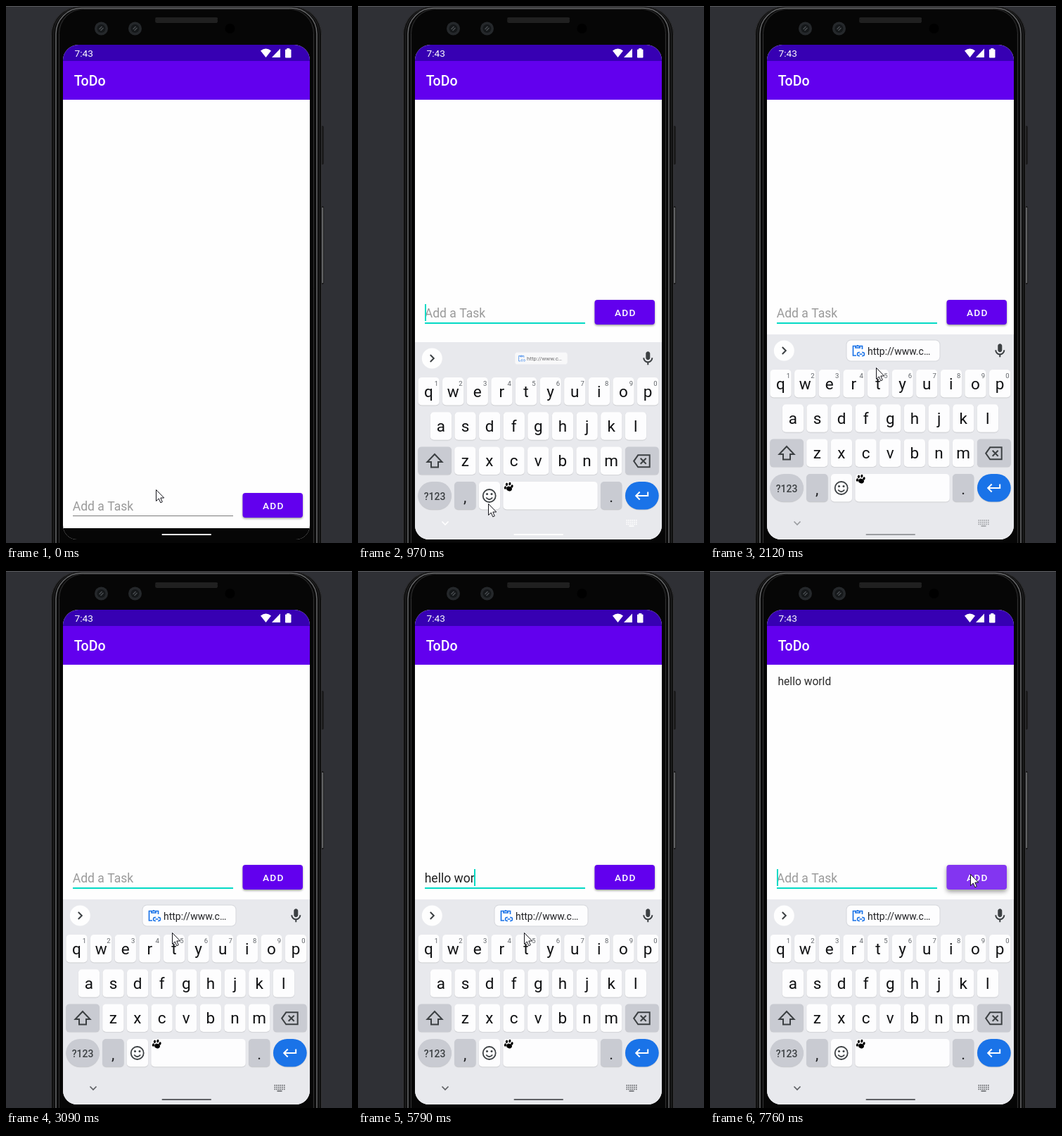
Animation, 492 px wide and 762 px high, one loop 8000 ms. Source, as an HTML page with a canvas:

```html
<!DOCTYPE html>
<html lang="en">
<head>
<meta charset="utf-8">
<title>ToDo app</title>
<style>
html, body { margin: 0; width: 100%; height: 100%; overflow: hidden; background: #2f3035; }
canvas { display: block; }
</style>
</head>
<body>
<canvas id="stage" width="492" height="762"></canvas>
<script>
const ctx = document.getElementById('stage').getContext('2d');
const LOOP = 8000;
const PURPLE = '#6200ee', TEAL = '#03dac5', INK = '#3c4043', BLUE = '#1a73e8';
const LIFT = 274;      // how far the input row rises above the keyboard
const PITCH = 34.62;   // distance between neighbouring keys

// Each track holds [start time, value]; values change abruptly.
const typed = [[0, ''], [3220, 'h'], [3640, 'he'], [3840, 'hell'], [4040, 'h'],
  [4960, 'he'], [5160, 'hell'], [5360, 'hello '], [5640, 'hello w'], [5790, 'hello wor'],
  [5940, 'hello worl'], [6090, 'hello world'], [7630, '']];
const caretOn = [[0, false], [820, true], [1270, false], [1670, true], [2120, false],
  [2660, true], [3090, false], [3220, true], [4560, false], [4960, true],
  [6530, false], [7130, true]];
const pointer = [[0, [213, 686]], [120, [208, 696]], [240, [191, 713]], [360, [185, 706]],
  [1420, [194, 672]], [1570, [217, 585]], [1720, [232, 526]], [1820, [236, 513]],
  [6680, [282, 462]], [6830, [320, 416]], [6980, [348, 411]], [7130, [370, 430]]];
const navTone = [[0, '#fff'], [2120, '#9b9da1'], [2360, '#77797d'], [2660, '#5f6165']];
const ripple = [[0, 0], [7510, 22], [7630, 50], [7760, 90]];

const valueAt = (track, t) => track.findLast(([start]) => start <= t)[1];

function box(x, y, w, h, r, fill) {
  ctx.beginPath();
  ctx.roundRect(x, y, w, h, r);
  ctx.fillStyle = fill;
  ctx.fill();
}

function disc(x, y, rx, fill, ry = rx, turn = 0) {
  ctx.beginPath();
  ctx.ellipse(x, y, rx, ry, turn, 0, 7);
  ctx.fillStyle = fill;
  ctx.fill();
}

function text(str, x, y, size, fill, { weight = 400, align = 'left', spacing = 0 } = {}) {
  ctx.font = `${weight} ${size}px Roboto, sans-serif`;
  ctx.textAlign = align;
  ctx.letterSpacing = spacing + 'px';
  ctx.fillStyle = fill;
  ctx.fillText(str, x, y);
  ctx.letterSpacing = '0px';
}

// Draws path data with its local origin at (x, y).
function icon(data, x, y, { fill, stroke, width = 2, scale = 1 }) {
  const path = new Path2D(data);
  ctx.save();
  ctx.translate(x, y);
  ctx.scale(scale, scale);
  if (fill) { ctx.fillStyle = fill; ctx.fill(path); }
  if (stroke) { ctx.strokeStyle = stroke; ctx.lineWidth = width; ctx.stroke(path); }
  ctx.restore();
}

function withShadow(blur, dy, alpha, draw) {
  ctx.save();
  ctx.shadowColor = `rgba(0,0,0,${alpha})`;
  ctx.shadowBlur = blur;
  ctx.shadowOffsetY = dy;
  draw();
  ctx.restore();
}

function drawPhone() {
  ctx.fillStyle = '#2f3035';
  ctx.fillRect(0, 0, 492, 762);
  ctx.fillStyle = '#5b5c60';
  ctx.fillRect(0, 0, 492, 1);
  box(447, 170, 5, 55, 2, '#1b1b1c');
  box(447, 284, 5, 111, 2, '#1b1b1c');
  ctx.fillStyle = '#77787a';
  ctx.fillRect(449.5, 286, 1.5, 107);
  box(64, 1, 385, 820, 40, '#0a0a0a');
  [[64.5, '#353537', 1], [67.5, '#1c1c1d', 2], [71, '#68696b', 1.5], [75.5, '#303031', 1]]
    .forEach(([x, tone, width]) => {
      const inset = x - 64;
      ctx.beginPath();
      ctx.roundRect(x, 1 + inset * 0.3, 385 - 2 * inset, 820, 40 - inset * 0.5);
      ctx.strokeStyle = tone;
      ctx.lineWidth = width;
      ctx.stroke();
    });
  box(77, 5, 359, 800, 34, '#060606');

  box(212, 16, 89, 8, 2, '#1b1b1b');
  for (let y = 17; y < 24; y += 2)
    for (let x = 213 + y % 4 / 2; x < 300; x += 2) {
      ctx.fillStyle = '#303030';
      ctx.fillRect(x, y, 1, 1);
    }
  for (const x of [135.5, 183.5]) {
    disc(x, 32, 9.5, '#25282b');
    disc(x, 32, 6, '#15181a');
    icon('M-3 1L1-3M-1 3L3-1', x, 32, { stroke: '#4b5053', width: 1.3 });
  }
  disc(318.5, 32, 7, '#000');
}

function drawStatusBar() {
  ctx.fillStyle = '#3700b3';
  ctx.fillRect(81, 55, 351, 23);
  ctx.fillStyle = PURPLE;
  ctx.fillRect(81, 78, 351, 55);
  text('7:43', 97.5, 72, 13.7, '#fff');
  text('ToDo', 96.7, 113, 19.5, '#fff', { weight: 500 });
  icon('M0 3.5Q7.5-2.5 15 3.5L7.5 13Z', 362, 60, { fill: '#fff' });
  icon('M12 0V12.5H0Z', 378, 60.5, { fill: '#fff' });
  box(397, 61.5, 8.5, 12, 1, '#fff');
  box(399.3, 60, 4, 3, 0, '#fff');
}

function drawInputRow(t, raised) {
  const y = raised ? 0 : LIFT;
  const focused = t >= 820;
  const value = valueAt(typed, t);
  text(value || 'Add a Task', 94.7, 442 + y, 17.55, value ? '#212121' : '#9a9a9a');
  const textWidth = value ? ctx.measureText(value).width : 0;
  ctx.fillStyle = focused ? TEAL : '#7b7b7b';
  ctx.fillRect(95, 449 + y, 228, focused ? 2 : 1);
  if (valueAt(caretOn, t)) {
    ctx.fillStyle = TEAL;
    ctx.fillRect(95 + Math.floor(textWidth), 423 + y, 2, 24);
  }

  const radius = valueAt(ripple, t);
  withShadow(radius ? 6 : 3, radius ? 3 : 1.5, 0.4, () => box(336.5, 417 + y, 85.5, 35, 4, PURPLE));
  if (radius) {
    ctx.save();
    ctx.beginPath();
    ctx.roundRect(336.5, 417, 85.5, 35, 4);
    ctx.clip();
    ctx.fillStyle = 'rgba(255,255,255,.08)';
    ctx.fillRect(336, 417, 87, 35);
    disc(371, 432, radius, 'rgba(255,255,255,.14)');
    ctx.restore();
  }
  text('ADD', 365, 439.5 + y, 13.7, '#fff', { weight: 500, spacing: 1.22 });
}

function drawChip(settled) {
  ctx.save();
  ctx.translate(260.5, 489);
  if (!settled) { ctx.scale(0.56, 0.56); ctx.globalAlpha = 0.65; }
  box(-67, -15.5, 134, 31, 7, settled ? '#d5d7dc' : '#f4f5f8');
  box(-66, -14.5, 132, 29, 6, '#fdfdfe');
  icon('M-2 7H-6.5V-6.5H6.5V-2M-3-6.5V-4H3V-6.5M0-8V-6', -50.5, 0, { stroke: BLUE, width: 1.7 });
  icon('M3 1H2a2.5 2.5 0 0 0 0 5H3M6 1H7a2.5 2.5 0 0 1 0 5H6M2.5 3.5H6.5', -50.5, 1.5, { stroke: BLUE, width: 1.5 });
  text('http://www.c…', -36.5, 5.5, 14, '#202124');
  ctx.restore();
}

function drawKey(x, y, width, fill = '#fdfdfe', radius = 5) {
  withShadow(1, 0.7, 0.16, () => box(x, y, width, 39.5, radius, fill));
}

function drawLetters(letters, x, y, numbered) {
  [...letters].forEach((letter, i) => {
    const left = x + i * PITCH;
    drawKey(left, y, 30.3);
    text(letter, left + 15.1, y + 28, 22.5, '#101113', { align: 'center' });
    if (numbered) text(String((i + 1) % 10), left + 26, y + 11.5, 9.5, '#5f6368', { align: 'center' });
  });
}

function drawKeyboard(t) {
  const settled = t >= 1120;
  const grey = '#c9cbd2';
  ctx.save();
  ctx.translate(0, settled ? 0 : 11);
  ctx.fillStyle = '#e8e9ed';
  ctx.fillRect(81, 466, 351, 300);
  disc(105.3, 489, 14.5, '#fefefe');
  icon('M-2.5-5L2.5 0L-2.5 5', 105.3, 489, { stroke: INK });
  drawChip(settled);
  icon('M12 14c1.66 0 3-1.34 3-3V5c0-1.66-1.34-3-3-3S9 3.34 9 5v6c0 1.66 1.34 3 3 3zm5-3c0 2.76-2.24 5-5 5s-5-2.24-5-5H5c0 3.53 2.61 6.43 6 6.92V21h2v-3.08c3.39-.49 6-3.39 6-6.92h-2z',
    400.3, 477.3, { fill: INK });

  drawLetters('qwertyuiop', 85.4, 516, true);
  drawLetters('asdfghjkl', 102.8, 565.2);
  drawLetters('zxcvbnm', 137.2, 614.4);

  drawKey(85.4, 614.4, 47.5, grey);
  icon('M0-9.5L-10.5 1.5H-5V9H5V1.5H10.5Z', 109, 634.5, { stroke: INK });
  drawKey(380, 614.4, 47.7, grey);
  icon('M-5.5-8.5H11V8.5H-5.5L-11.5 0ZM-2-4L6 4M6-4L-2 4', 403.7, 634.8, { stroke: INK });

  drawKey(85.4, 664, 47.5, grey, 20);
  text('?123', 109, 689.5, 14, INK, { weight: 500, align: 'center' });
  drawKey(137.2, 664, 30.3, grey);
  text(',', 152.2, 693, 22, '#202124', { align: 'center' });
  drawKey(171.8, 664, 30.3);
  icon('M9 0A9 9 0 1 1-9 0A9 9 0 1 1 9 0M-4.5 2.5Q0 8 4.5 2.5', 186.7, 684, { stroke: INK, width: 1.8 });
  disc(183.5, 681.5, 1.5, INK);
  disc(190, 681.5, 1.5, INK);
  drawKey(206.3, 664, 134.5);
  drawKey(345, 664, 30.3, grey);
  text('.', 360.2, 693, 22, '#202124', { align: 'center' });
  drawKey(380, 664, 47.7, BLUE, 20);
  icon('M8.5-5.5V0H-8M-3-5.5L-8.5 0L-3 5.5', 403.7, 684, { stroke: '#fff' });

  disc(215, 674, 4, '#000', 3.3, 0.4);
  [[209.5, 672.5], [211.5, 667.8], [215.8, 667], [219, 670.5]]
    .forEach(([x, y]) => disc(x, y, 1.6, '#000', 2.2, 0.2));
  ctx.restore();

  const tone = valueAt(navTone, t);
  icon('M-4.5-2L0 2.5L4.5-2', 124, 733.5, { stroke: tone, width: 1.7 });
  ctx.fillStyle = tone;
  for (let row = 0; row < 3; row++)
    for (let col = 0; col < 6; col++) ctx.fillRect(381.5 + col * 2.7, 729 + row * 2.8, 1.6, 1.6);
  ctx.fillRect(385.5, 737.2, 7, 1.5);
  box(221.5, 749, 70.5, 2, 1, tone);
}

function drawScreen(t) {
  const raised = t >= 970;
  ctx.save();
  ctx.beginPath();
  ctx.roundRect(81, 55, 351, 702, [22, 22, 20, 20]);
  ctx.clip();
  ctx.fillStyle = '#fefefe';
  ctx.fillRect(81, 55, 351, 702);
  drawStatusBar();
  if (t >= 7630) text('hello world', 96.5, 162, 15.6, '#2b2b2b');
  drawInputRow(t, raised);
  if (raised) {
    drawKeyboard(t);
  } else {
    ctx.fillStyle = '#060606';
    ctx.fillRect(81, 741, 351, 20);
    box(221.5, 749, 70.5, 2, 1, '#fff');
  }
  ctx.restore();
}

function drawPointer(t) {
  const [x, y] = valueAt(pointer, t);
  icon('M.5.5V16.5L4.3 13L6.8 18.8L9.3 17.7L6.8 12H11.7Z', x, y,
    { fill: '#fff', stroke: '#15151c', width: 1 });
}

function frame() {
  const t = performance.now() % LOOP;
  drawPhone();
  drawScreen(t);
  drawPointer(t);
  requestAnimationFrame(frame);
}
frame();
</script>
</body>
</html>
```
